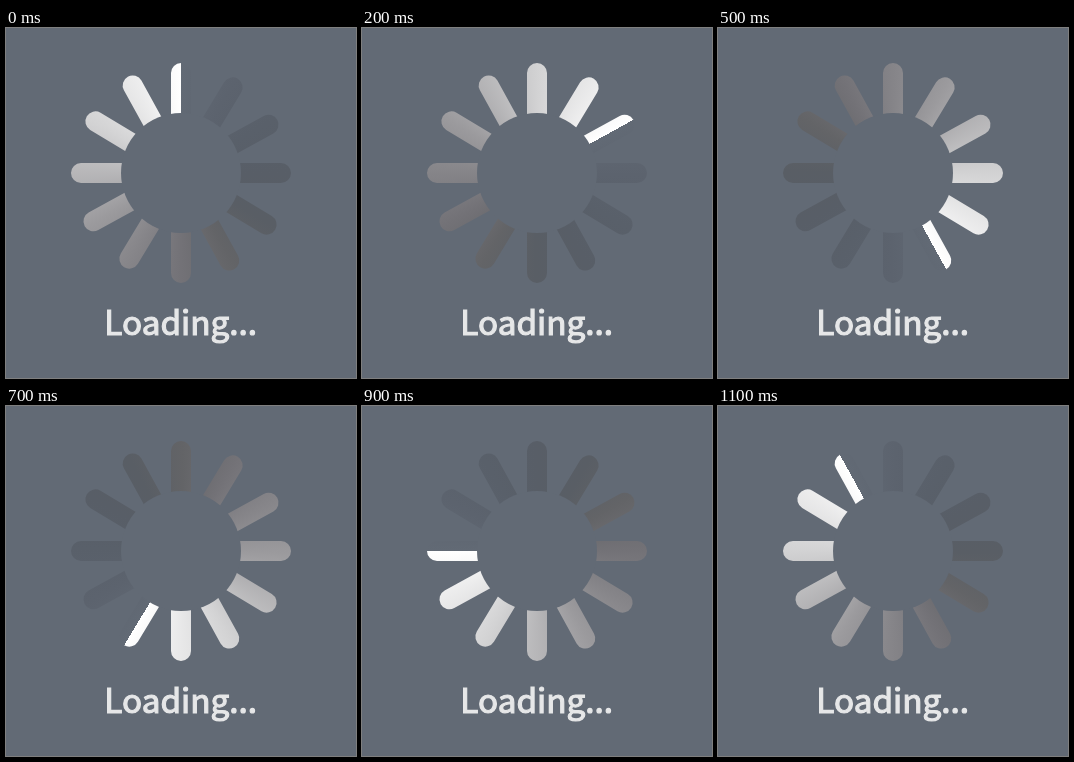
An HTML page with a canvas that plays this animation: 350 by 350 pixels, repeating every 1200 ms.

```html
<!DOCTYPE html>
<html lang="en">
<head>
<meta charset="utf-8">
<title>Loading</title>
<style>
  html, body { margin: 0; width: 100%; height: 100%; overflow: hidden; background: #626a75; }
  canvas, svg { position: absolute; left: 0; top: 0; }
  text {
    font: 400 33.3px "Noto Sans CJK SC", "Noto Sans CJK JP", "Noto Sans CJK", "Noto Sans", sans-serif;
    fill: #e6e7e8; stroke: #e6e7e8; stroke-width: 1.2px; text-anchor: middle;
  }
</style>
</head>
<body>
<canvas width="350" height="350"></canvas>
<svg width="350" height="350"><text x="174.7" y="307">Loading...</text></svg>
<script>
const ctx = document.querySelector('canvas').getContext('2d');
const BG = '#626a75', CX = 175, CY = 145, SPOKES = 12, STEP = 100;
const TURN = 2 * Math.PI;

// Clockwise from the sweep's hard edge, in twelfths of a turn
const shades = [
  [0, BG], [1, '#5c636e'], [2, '#59606a'], [3, '#585e67'], [4, '#595e65'],
  [5, '#636467'], [6, '#737277'], [7, '#868589'], [8, '#9b9a9d'],
  [10, '#d3d3d4'], [12, '#ffffff']
];

// Diagonal spokes sit one degree past the even spacing
const angle = i => (i * 30 + (i % 3 ? 1.1 : 0) - 90) / 360 * TURN;

const spokes = new Path2D();
for (let i = 0; i < SPOKES; i++) {
  const x = Math.cos(angle(i)), y = Math.sin(angle(i));
  spokes.moveTo(CX + 50 * x, CY + 50 * y);
  spokes.lineTo(CX + 100 * x, CY + 100 * y);
}

const hub = new Path2D();
hub.arc(CX, CY, 60, 0, TURN);

function draw(now) {
  const step = Math.floor(now / STEP) % SPOKES;
  const sweep = ctx.createConicGradient(angle(step), CX, CY);
  for (const [at, color] of shades) sweep.addColorStop(at / 12, color);

  ctx.fillStyle = BG;
  ctx.fillRect(0, 0, 350, 350);
  ctx.lineWidth = 20;
  ctx.lineCap = 'round';
  ctx.strokeStyle = sweep;
  ctx.stroke(spokes);
  ctx.fill(hub);
}

const start = performance.now();
function tick() {
  draw(performance.now() - start);
  requestAnimationFrame(tick);
}
tick();
</script>
</body>
</html>
```
